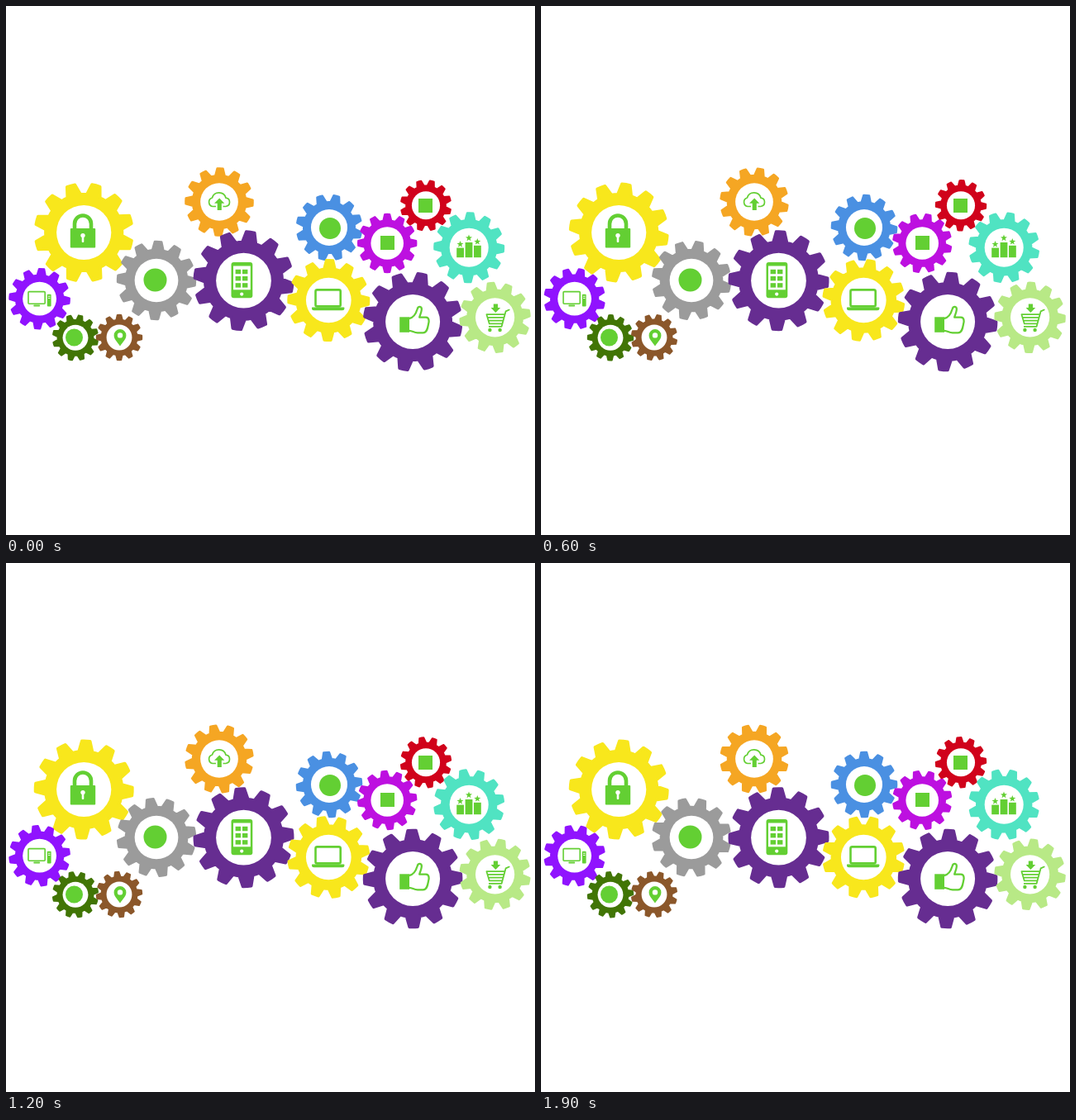
An HTML page with a canvas for the animation above (2000 ms loop, 640 px wide and 640 px high).

```html
<!DOCTYPE html>
<html lang="en">
<head>
<meta charset="utf-8">
<title>Turning gears</title>
<style>
  html, body { margin: 0; width: 100%; height: 100%; overflow: hidden; background: #fff; }
  canvas { display: block; width: 100vw; height: 100vh; }
</style>
</head>
<body>
<canvas id="stage" width="640" height="640"></canvas>
<script>
const ctx = document.getElementById('stage').getContext('2d');
const GREEN = '#63cf33';
const LOOP = 2000, TICK = 100, TEETH = 12;
const DEG = Math.PI / 180;

// Degrees turned per tick: smaller gears turn faster
const LARGE = 9, MEDIUM = 13.5, SMALL = 18;

const gear = (x, y, r, color, step, phase, icon) => ({ x, y, r, color, step, phase, icon });

const gears = [
  gear(94.2, 274, 60.5, '#f8e71c', LARGE, 14.5, lock),
  gear(182, 332, 48.2, '#9b9b9b', -MEDIUM, 2.5, () => dot(180.5, 331.5, 14)),
  gear(258, 237, 41.8, '#f5a623', -MEDIUM, 1.5, cloud),
  gear(287.5, 332.2, 61, '#662d91', LARGE, 8, phone),
  gear(391, 268, 40.3, '#4a90e2', MEDIUM, 13, () => dot(392, 269, 13)),
  gear(390.3, 356, 50, '#f8e71c', -MEDIUM, 1.5, laptop),
  gear(461.2, 287, 36.2, '#bd10e0', -SMALL, 0, () => block(453, 278, 17, 17)),
  gear(508, 241.3, 31.2, '#d0021b', SMALL, 14, () => block(499, 233, 17, 17)),
  gear(560.2, 292.2, 43, '#50e3c2', -MEDIUM, 2, podium),
  gear(492.1, 382, 60.3, '#662d91', LARGE, 11, thumb),
  gear(591.6, 376.8, 43.2, '#b8e986', -MEDIUM, -7, cart),
  gear(40.6, 354.2, 37.3, '#9013fe', -MEDIUM, 4, computer),
  gear(84, 401.3, 28.2, '#417505', SMALL, 13, () => dot(82.5, 401, 10.5)),
  gear(137, 401, 28.2, '#8b572a', -SMALL, 0, pin)
];

function dot(x, y, r, color = GREEN) {
  ctx.fillStyle = color;
  ctx.beginPath();
  ctx.arc(x, y, r, 0, 2 * Math.PI);
  ctx.fill();
}

function block(x, y, w, h, r = 0, color = GREEN) {
  ctx.fillStyle = color;
  ctx.beginPath();
  ctx.roundRect(x, y, w, h, r);
  ctx.fill();
}

function frame(x, y, w, h, r, width) {
  ctx.strokeStyle = GREEN;
  ctx.lineWidth = width;
  ctx.beginPath();
  ctx.roundRect(x, y, w, h, r);
  ctx.stroke();
}

function shape(d) {
  ctx.fillStyle = GREEN;
  ctx.fill(new Path2D(d));
}

function line(d, width) {
  ctx.strokeStyle = GREEN;
  ctx.lineWidth = width;
  ctx.lineJoin = 'round';
  ctx.stroke(new Path2D(d));
}

function star(x, y, r) {
  ctx.fillStyle = GREEN;
  ctx.beginPath();
  for (let i = 0; i < 10; i++) {
    const a = (i * 36 - 90) * DEG, q = i % 2 ? r * 0.42 : r;
    ctx.lineTo(x + q * Math.cos(a), y + q * Math.sin(a));
  }
  ctx.fill();
}

function lock() {
  line('M83 270V263.5A10 10 0 0 1 103 263.5V270', 4.6);
  block(77.8, 269, 30.4, 23.4, 1);
  dot(93, 277.6, 2.7, '#fff');
  block(91.7, 278, 2.6, 8, 1, '#fff');
}

function cloud() {
  line('M254 242.5H250A5.4 5.4 0 0 1 249.5 232A8.6 8.6 0 0 1 266 232.2A5.2 5.2 0 0 1 266 242.5H262.5', 1.7);
  shape('M258.2 232.5L264.3 238.8H260.8V247H255.7V238.8H252Z');
}

function phone() {
  block(272.5, 310, 25.8, 43.3, 3);
  block(275, 314.5, 20.8, 28.8, 0, '#fff');
  for (let row = 0; row < 3; row++)
    for (let col = 0; col < 2; col++)
      block(277.6 + 8.4 * col, 318.8 + 8.2 * row, 6.4, 5.4);
  dot(285.2, 348.6, 2.1, '#fff');
}

function laptop() {
  frame(374.5, 343.4, 30.2, 20, 2, 2.6);
  block(370, 364.6, 39.4, 3.6, [0.5, 0.5, 2.5, 2.5]);
}

function podium() {
  block(545.2, 292.6, 8.8, 11.6);
  block(555.6, 286, 8.8, 18.2);
  block(566, 289.8, 8.8, 14.4);
  star(549.5, 288.3, 4.2);
  star(560, 280.8, 4.2);
  star(570.3, 285.2, 4.2);
}

function thumb() {
  block(476.2, 376.3, 11.8, 18.5);
  line('M488 378C493 377 496 372 497.5 367C498.5 362.5 503.5 362.8 502.8 367.5' +
       'C502.4 371.5 500.8 374 500.2 376.6H508C512 377 512.2 381 511 385' +
       'C510.3 389 509.5 395.3 504.5 395.3H498C493.5 395.3 492 393 488 392.8', 2.3);
}

function cart() {
  shape('M589.8 360.5H595V365H598.2L592.4 371L586.6 365H589.8Z');
  line('M609.4 367.2L604.6 369.4L599.6 387.8H584', 1.8);
  line('M603 373.2H581.4L584.8 384.4H600M582.4 376.8H602M583.6 380.6H601', 1.7);
  dot(585.4, 392, 2.2);
  dot(597.6, 392, 2.2);
}

function computer() {
  frame(27, 345.6, 20.2, 14.6, 1, 1.6);
  block(33.2, 361.6, 8, 1.9, 1);
  block(49.8, 348.8, 4.8, 14.8, 1);
  block(51, 350.8, 2.4, 0.9, 0, '#fff');
  block(51, 353, 2.4, 0.9, 0, '#fff');
}

function pin() {
  shape('M138 411.5C135 406.5 130.6 403.5 130.6 398.4A7.4 7.4 0 0 1 145.4 398.4C145.4 403.5 141 406.5 138 411.5Z');
  dot(138, 398.4, 3.2, '#fff');
}

function drawGear({ x, y, r, color, step, phase, icon }, tick) {
  const root = r * 0.765, tip = r * 0.97;
  ctx.save();
  ctx.translate(x, y);
  ctx.rotate((phase + step * tick - 90) * DEG);
  ctx.beginPath();
  for (let i = 0; i < TEETH; i++) {
    const a = i * 360 / TEETH;
    ctx.arc(0, 0, root, (a - 19.5) * DEG, (a - 10) * DEG);
    ctx.arc(0, 0, tip, (a - 4.9) * DEG, (a + 4.9) * DEG);
  }
  ctx.closePath();
  ctx.fillStyle = ctx.strokeStyle = color;
  ctx.lineWidth = r * 0.06;
  ctx.lineJoin = 'round';
  ctx.fill();
  ctx.stroke();
  ctx.restore();
  dot(x, y, r * 0.547, '#fff');
  icon();
}

function draw(now) {
  const tick = Math.floor((now % LOOP) / TICK);
  ctx.fillStyle = '#fff';
  ctx.fillRect(0, 0, 640, 640);
  for (const g of gears) drawGear(g, tick);
}

const start = performance.now();
function loop() {
  draw(performance.now() - start);
  requestAnimationFrame(loop);
}
loop();
</script>
</body>
</html>
```
